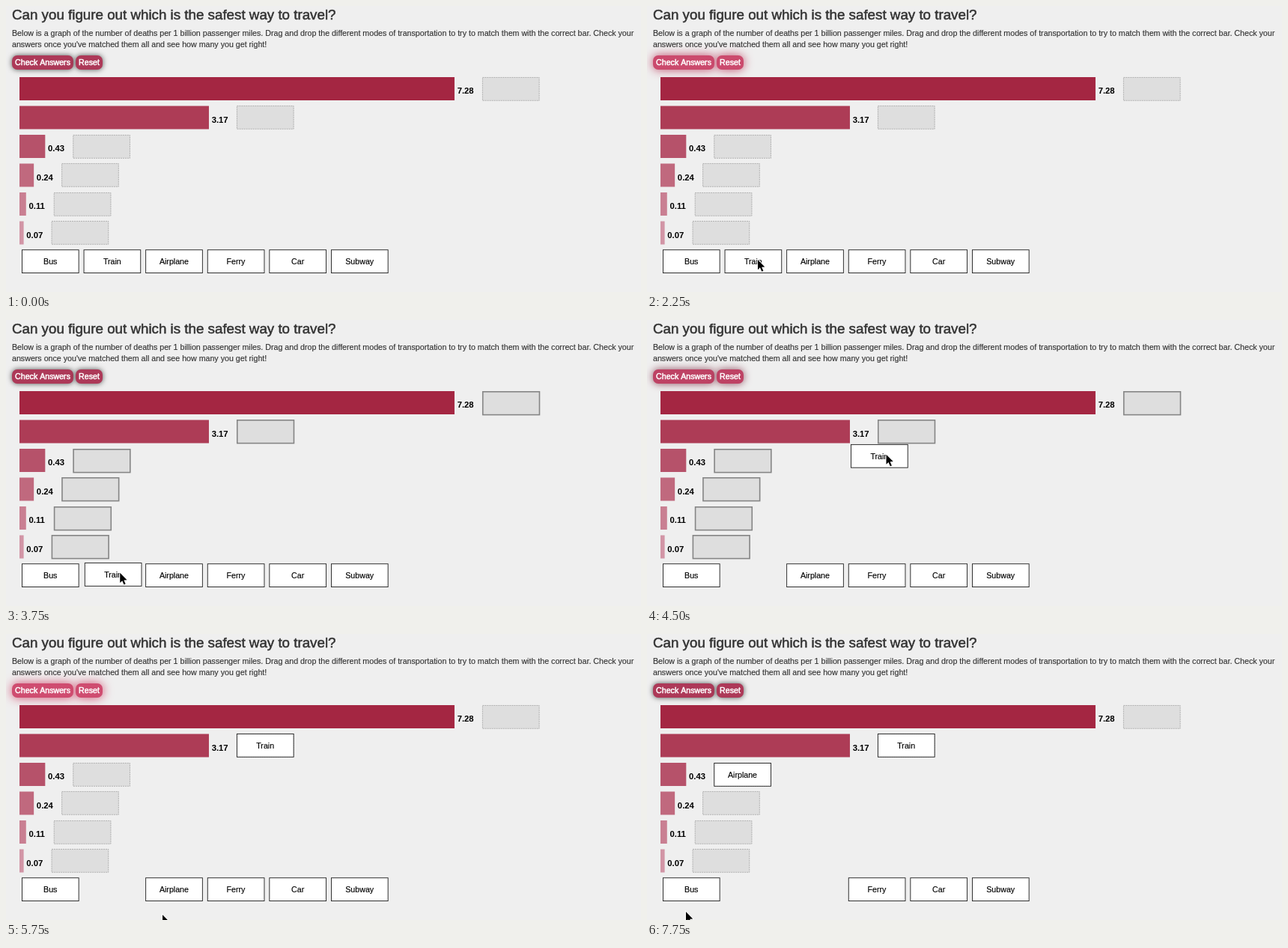
Animation, 848 px wide and 382 px high, one loop 8 s. Source, as an HTML page with a canvas:

```html
<!DOCTYPE html>
<html lang="en">
<head>
<meta charset="utf-8">
<title>Safest way to travel</title>
<style>
  html, body { margin: 0; width: 100%; height: 100%; overflow: hidden; background: #efefef; }
  canvas { display: block; }
</style>
</head>
<body>
<canvas id="stage" width="848" height="382"></canvas>
<script>
const ctx = document.getElementById('stage').getContext('2d');
const LOOP = 8000, STEP = 250, PULSE = 3850;
const SANS = '"Liberation Sans", Arial, sans-serif';
const BOX_W = 75.7, BOX_H = 30.8;

const lerp = (a, b, k) => a + (b - a) * k;
const mix = (a, b, k) => `rgb(${a.map((v, i) => Math.round(lerp(v, b[i], k)))})`;
const smooth = k => k * k * (3 - 2 * k);

const bars = [7.28, 3.17, 0.43, 0.24, 0.11, 0.07].map((value, i, all) => ({
  value,
  color: mix([164, 38, 66], [210, 149, 166], i / (all.length - 1)),
  width: value * 79.8,
  y: 95 + 38.5 * i,
  slot: { x: 55 + value * 79.8, y: Math.floor(95 + 38.5 * i) }
}));

const boxes = ['Bus', 'Train', 'Airplane', 'Ferry', 'Car', 'Subway']
  .map((label, i) => ({ label, home: { x: 21 + 82.6 * i, y: 325.3 } }));
Object.assign(boxes[1], { start: 3500, drop: 5250, slot: bars[1].slot });
Object.assign(boxes[2], { start: 6250, drop: 7250, slot: bars[2].slot });

// Where the pointer starts, turns and rests
const stops = [
  { t: 250, x: 459, y: 2 },
  { t: 1500, x: 240, y: 342 },
  { t: 2250, x: 148, y: 339 },
  { t: 3250, x: 151, y: 339 },
  { t: 3700, x: 151, y: 339 },
  { t: 4784, x: 354, y: 147 },
  { t: 5000, x: 354, y: 147 },
  { t: 5750, x: 209, y: 375 },
  { t: 6250, x: 213, y: 325 },
  { t: 6890, x: 117, y: 178 },
  { t: 7000, x: 117, y: 178 },
  { t: 7750, x: 52, y: 371 }
];

// cubic-bezier(.25, .1, .25, 1)
function ease(x) {
  let lo = 0, hi = 1, s = 0.5;
  const curve = (p, q) => 3 * (1 - s) ** 2 * s * p + 3 * (1 - s) * s * s * q + s ** 3;
  for (let i = 0; i < 20; i++) {
    s = (lo + hi) / 2;
    if (curve(0.25, 0.25) < x) lo = s; else hi = s;
  }
  return curve(0.1, 1);
}

function glowAt(t) {
  const phase = (t / PULSE + 0.975) % 1;
  return phase < 0.5 ? ease(phase * 2) : 1 - ease(phase * 2 - 1);
}

function pointerAt(t) {
  const next = stops.findIndex(stop => stop.t > t);
  if (next === 0) return null;
  if (next < 0) return stops[stops.length - 1];
  const a = stops[next - 1], b = stops[next];
  const k = smooth((t - a.t) / (b.t - a.t));
  return { x: lerp(a.x, b.x, k), y: lerp(a.y, b.y, k) };
}

const isDragged = (box, t) => t >= box.start && t < box.drop;

function boxAt(box, t) {
  if (t >= box.drop) return box.slot;
  if (!isDragged(box, t)) return box.home;
  const from = pointerAt(box.start), to = pointerAt(t);
  return { x: box.home.x + to.x - from.x, y: box.home.y + to.y - from.y };
}

// A thin outline of the same colour gives in-between font weights
function text(str, x, y, font, { color = '#000', align = 'left', weight = 0.15 } = {}) {
  ctx.font = `${font} ${SANS}`;
  ctx.fillStyle = ctx.strokeStyle = color;
  ctx.lineWidth = weight;
  ctx.textAlign = align;
  ctx.fillText(str, x, y);
  ctx.strokeText(str, x, y);
}

function drawHeading() {
  text('Can you figure out which is the safest way to travel?', 8, 18, '18.75px',
    { color: '#333', weight: 0.5 });
  text('Below is a graph of the number of deaths per 1 billion passenger miles. Drag and drop the different modes of transportation to try to match them with the correct bar. Check your',
    8, 40.3, '10.66px', { color: '#333' });
  text("answers once you've matched them all and see how many you get right!",
    8, 55.3, '10.66px', { color: '#333' });
}

function drawButton(label, x, width, glow) {
  ctx.save();
  ctx.shadowColor = mix([80, 80, 80], [208, 72, 108], glow);
  ctx.shadowBlur = lerp(7.5, 14, glow);
  ctx.fillStyle = mix([173, 57, 88], [207, 76, 112], glow);
  ctx.beginPath();
  ctx.roundRect(x, 66, width, 19, 7);
  ctx.fill();
  ctx.restore();
  text(label, x + width / 2, 79, '10.65px', { color: '#fff', align: 'center', weight: 0.5 });
}

function drawPanel({ x, y }, fill, line, lineWidth) {
  const inset = lineWidth / 2;
  ctx.fillStyle = fill;
  ctx.fillRect(x + inset, y + inset, BOX_W, BOX_H);
  ctx.strokeStyle = line;
  ctx.lineWidth = lineWidth;
  ctx.strokeRect(x + inset, y + inset, BOX_W, BOX_H);
}

function drawBar(bar, active) {
  ctx.fillStyle = bar.color;
  ctx.fillRect(18, bar.y, bar.width, 31);
  text(bar.value.toFixed(2), 21.7 + bar.width, bar.y + 22.2, 'bold 11.3px', { weight: 0.01 });

  if (active) {
    drawPanel(bar.slot, '#dedede', '#858585', 1.6);
  } else {
    ctx.setLineDash([2, 1]);
    drawPanel(bar.slot, '#dedede', '#aaa', 0.9);
    ctx.setLineDash([]);
  }
}

function drawBox(label, place) {
  drawPanel(place, '#fff', '#1c1c1c', 0.9);
  text(label, place.x + 38.2, place.y + 19.8, '10.65px', { align: 'center' });
}

function drawPointer({ x, y }) {
  ctx.save();
  ctx.translate(x, y);
  ctx.scale(0.9, 0.9);
  ctx.beginPath();
  [[0, 0], [0, 14.6], [3.3, 11.5], [5.9, 17.4], [8.2, 16.4], [5.7, 10.7], [10.3, 10.5]]
    .forEach(p => ctx.lineTo(...p));
  ctx.closePath();
  ctx.strokeStyle = '#fff';
  ctx.lineWidth = 1.8;
  ctx.stroke();
  ctx.fillStyle = '#000';
  ctx.fill();
  ctx.restore();
}

function draw(t) {
  const glow = glowAt(t);
  const pointer = pointerAt(t);
  const active = boxes.some(box => isDragged(box, t));

  ctx.fillStyle = '#efefef';
  ctx.fillRect(0, 0, 848, 382);
  drawHeading();
  drawButton('Check Answers', 8, 82, glow);
  drawButton('Reset', 93, 36, glow);
  bars.forEach(bar => drawBar(bar, active));
  boxes.forEach(box => drawBox(box.label, boxAt(box, t)));
  if (pointer) drawPointer(pointer);
}

const origin = performance.now();
function tick() {
  const t = (performance.now() - origin) % LOOP;
  draw(Math.floor(t / STEP) * STEP);
  requestAnimationFrame(tick);
}
tick();
</script>
</body>
</html>
```
